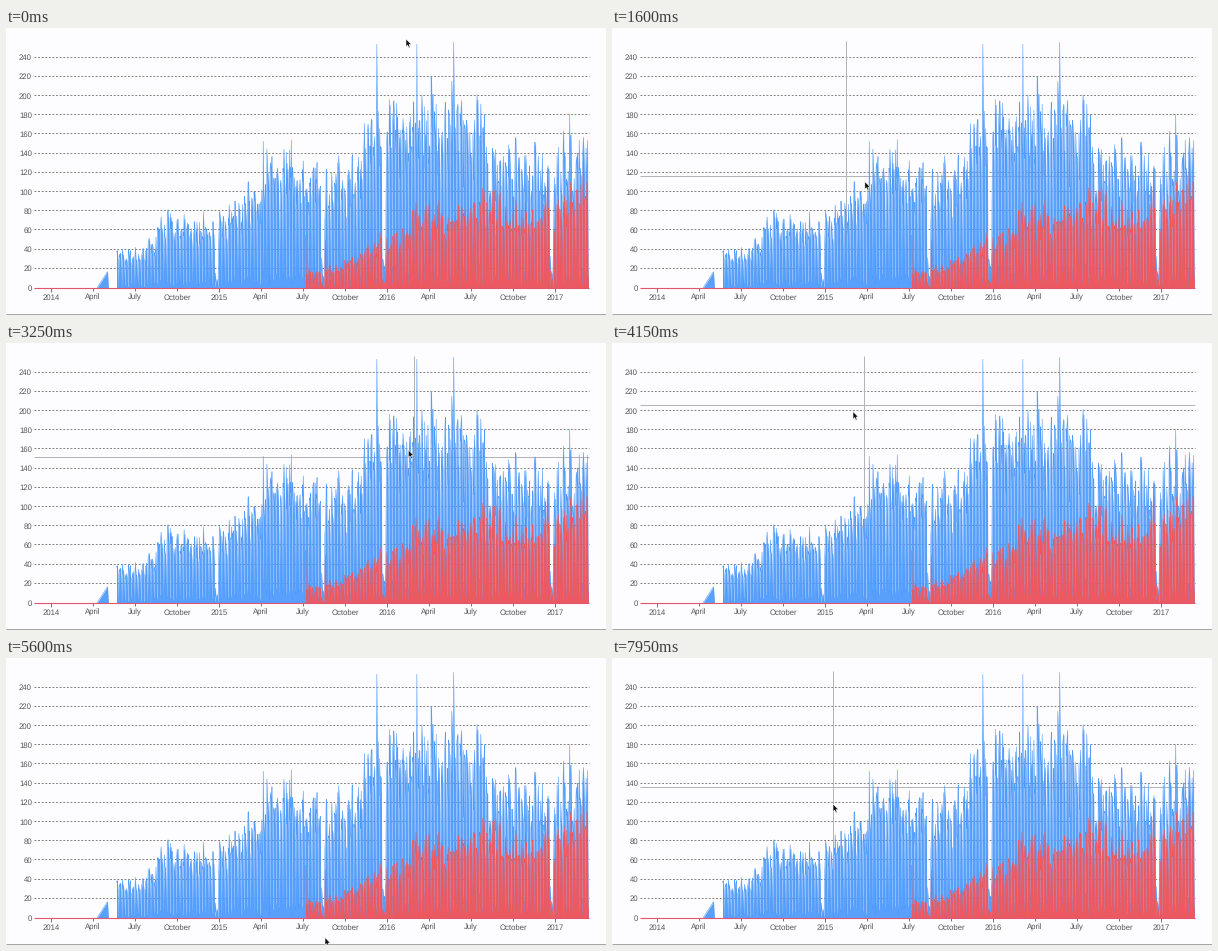
Animation, 600 px wide and 287 px high, one loop 8 s. Source, as a matplotlib script:

```python
import numpy as np
import matplotlib.pyplot as plt
from matplotlib.animation import FuncAnimation
from matplotlib.patches import Polygon

W, H, DPI = 600, 287, 100
STEP, LOOP = 50, 8000
PX = 72 / DPI
LEFT, RIGHT, TOP, BASE = 28, 582.5, 13, 260
UNIT = 230.4 / 240
DAY = 168 / 365.25
START = 110.5
BLUE, RED = "#4f9bfb", "#f4565a"
HOLIDAYS = [210.5, 317, 378, 545.5]

plt.rcParams["font.family"] = "Liberation Sans"
plt.rcParams["text.hinting"] = "none"
fig = plt.figure(figsize=(W / DPI, H / DPI), dpi=DPI, facecolor="#fdfcfe")
ax = fig.add_axes([0, 0, 1, 1])
ax.set_xlim(0, W)
ax.set_ylim(H, 0)
ax.axis("off")


def line(xs, ys, color, width=1.0, **kw):
    return ax.plot(xs, ys, color=color, lw=width * PX,
                   solid_capstyle="butt", dash_capstyle="butt", **kw)[0]


def label(x, y, text, ha):
    ax.text(x, y, text, ha=ha, va="center_baseline", color="#555555",
            fontsize=7.8 * PX)


def daily(trend, spikes, seed):
    """Busy weekdays and quiet weekends under a trend, with a few spikes."""
    rng = np.random.default_rng(seed)
    tx, tv = np.array(trend).T
    x = np.arange(tx[0], RIGHT, DAY)
    day = np.round((x - START) / DAY).astype(int) + 2
    week = rng.uniform(0.74, 1.06, 200)[day // 7]
    work = rng.uniform(0.6, 1.0, x.size)
    rest = rng.uniform(0.02, 0.14, x.size)
    v = np.interp(x, tx, tv) * week * np.where(day % 7 < 5, work, rest)
    for h in HOLIDAYS:
        v *= 1 - 0.88 * np.exp(-((x - h) / 1.9) ** 4)
    for sx, sv in spikes:
        v[np.abs(x - sx).argmin()] = sv
    return x, v


def area(x, v, color):
    y = BASE - np.asarray(v) * UNIT
    ax.fill_between(x, y, BASE, color=color, alpha=0.95, lw=0, zorder=2)
    line(x, y, color, 0.55, solid_joinstyle="bevel", zorder=2)


# grid and axes; whole coordinates snap to the centre of a pixel row
for value in range(0, 241, 20):
    y = BASE - value * UNIT
    label(26, y - 0.3, str(value), "right")
    if value:
        line([LEFT, RIGHT], [round(y) - 1] * 2, "#777777", 0.9,
             dashes=(2.1, 1.9), zorder=0.5)
names = ["", "April", "July", "October"]
for i in range(13):
    x = 45 + 42 * i
    label(x, 268.8, names[i % 4] or str(2014 + i // 4), "center")
    line([x, x], [BASE, BASE + (4 if i % 4 == 0 else 3)], "#555555", 0.8)
line([0, W], [H - 1] * 2, "#a6a6a6")

# series
area([91, 101.5, 102.3], [0, 17, 0], BLUE)
area(*daily([(START, 40), (140, 46), (160, 80), (213, 78), (260, 138),
             (283, 158), (300, 134), (345, 146), (366, 208), (412, 226),
             (450, 224), (470, 210), (490, 168), (530, 152), (583, 164)],
            [(257, 153), (371, 254), (411, 254), (447.5, 256), (563.5, 181)],
            4), BLUE)
area(*daily([(299.5, 20), (316, 20), (330, 29), (350, 35), (370, 60),
             (396, 64), (410, 94), (465, 100), (530, 95), (583, 132)],
            [(299.5, 55), (319.5, 50), (541.5, 125)], 9), RED)
line([LEFT, RIGHT], [BASE, BASE], "#e0566e", 1.1, zorder=3)

# pointer path: time, x, y, and velocity in pixels per step
PATH = np.array([
    (0, 400, 11, -12, 2),
    (950, 132.5, 98.5, -7, 2.5),
    (2300, 449.5, 203.5, 1.5, 1),
    (4150, 241, 68.5, -11.5, 6.5),
    (5100, 280, 265, 4, 4),
    (5600, 319, 279.5, 5, -1),
    (5950, 385, 235, 11, -12),
    (6550, 527, 31, 0.5, -5),
    (6850, 500, 8, -8, 0),
    (7950, 221, 146, 0, 17),
])


def pointer(t):
    """Position and velocity on a cubic Hermite path."""
    i = int(np.clip(np.searchsorted(PATH[:, 0], t, "right") - 1,
                    0, len(PATH) - 2))
    a, b = PATH[i], PATH[i + 1]
    n = (b[0] - a[0]) / STEP
    s = (t - a[0]) / (b[0] - a[0])
    p, q, u, w = a[1:3], b[1:3], a[3:] * n, b[3:] * n
    c3, c2 = 2 * p - 2 * q + u + w, 3 * q - 3 * p - 2 * u - w
    pos = ((c3 * s + c2) * s + u) * s + p
    vel = ((3 * c3 * s + 2 * c2) * s + u) / n
    return pos, vel


ARROW = np.array([(0, 0), (0, 7.6), (1.7, 6.1), (2.9, 8.8), (4.1, 8.3),
                  (3, 5.6), (5.3, 5.4)])
cross_v = line([0, 0], [TOP, BASE], "#b4b4b6", zorder=0.6)
cross_h = line([LEFT, RIGHT], [0, 0], "#b4b4b6", zorder=0.6)
arrow = Polygon(ARROW, closed=True, fc="#111111", ec="white",
                lw=0.5 * PX, zorder=6)
ax.add_patch(arrow)


def update(i):
    pos, vel = pointer(i * STEP)
    x, y = pos
    inside = LEFT <= x <= RIGHT and TOP <= y <= BASE
    # the crosshair trails the pointer by one step
    cx = np.clip(x - vel[0], LEFT, RIGHT)
    cy = np.clip(y - vel[1], TOP, BASE)
    cross_v.set_xdata([np.floor(cx)] * 2)
    cross_h.set_ydata([np.floor(cy) - 0.2] * 2)
    cross_v.set_visible(inside)
    cross_h.set_visible(inside)
    arrow.set_xy(ARROW + pos)
    return cross_v, cross_h, arrow


anim = FuncAnimation(fig, update, frames=LOOP // STEP, interval=STEP,
                     repeat=True, repeat_delay=0, blit=False)
plt.show()
```
